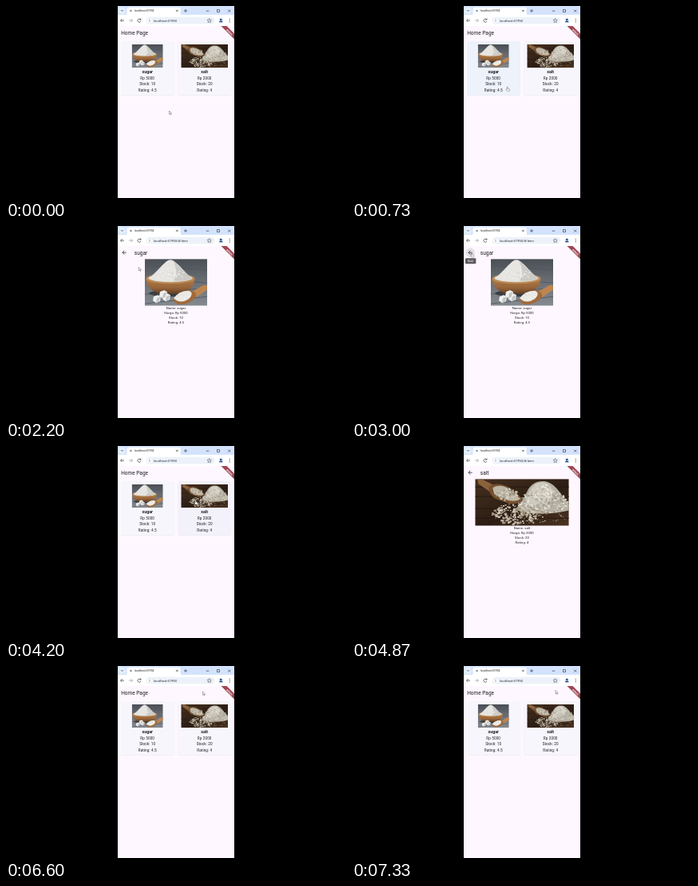
Animation, 426 px wide and 240 px high, one loop 7390 ms. Source, as an HTML page:

```html
<!DOCTYPE html>
<html lang="en">
<head>
<meta charset="utf-8">
<title>Shop demo</title>
<style>
html, body { margin: 0; width: 100%; height: 100%; overflow: hidden; background: #000; }
svg { display: block; width: 100vw; height: 100vh; font-family: Roboto, Arial, sans-serif; }
.line { fill: none; stroke: #454951; stroke-width: .75; }
</style>
</head>
<body>
<svg id="stage" viewBox="0 0 426 240"></svg>
<script>
const LOOP = 7390, STEP = 1000 / 15;
const stage = document.getElementById('stage');

let seed = 17;
const rand = () => (seed = (seed * 16807) % 2147483647) / 2147483647;
const text = (x, y, size, str, attrs = '') =>
  `<text x="${x}" y="${y}" font-size="${size}" fill="#1d1b20" ${attrs}>${str}</text>`;
const centered = (x, y, size, str, gap, attrs = '') =>
  text(x, y, size, str, `text-anchor="middle" letter-spacing="${gap}" ${attrs}`);
const box = (x, y, w, h, fill, attrs = '') =>
  `<rect x="${x}" y="${y}" width="${w}" height="${h}" fill="${fill}" ${attrs}/>`;
const path = (d, fill, attrs = '') => `<path d="${d}" fill="${fill}" ${attrs}/>`;
const line = (d, attrs = '') => `<path class="line" d="${d}" ${attrs}/>`;

// Random specks inside an ellipse
function grains(count, cx, cy, rx, ry, colors, size) {
  let out = '';
  for (let i = 0; i < count; i++) {
    const a = rand() * Math.PI * 2, r = Math.sqrt(rand()), s = size * (.5 + rand());
    out += box((cx + Math.cos(a) * r * rx).toFixed(1), (cy + Math.sin(a) * r * ry).toFixed(1),
      s.toFixed(1), (s * .8).toFixed(1), colors[i % colors.length]);
  }
  return out;
}

function sugarPicture() {
  const cube = (x, y) => path(`M${x} ${y}l5-2 4 2-1 6-5 2-4-3z`, '#f0f0ee') +
    path(`M${x + 4} ${y + 2}l4-2-1 6-4 2z`, '#c3c4c6');
  return box(0, 0, 78, 58.5, 'url(#slate)') +
    line('M0 8L78 14M0 24L78 30M0 44L78 36M0 56L78 47', 'style="stroke:#50555c;stroke-width:.8"') +
    '<ellipse cx="34" cy="43" rx="29" ry="4" fill="#3b3d42"/>' +
    path('M1.5 24C1 34 10 42 22 43.5H42C55 42 63 33 62.5 24Z', 'url(#bowl)') +
    '<ellipse cx="32" cy="24.5" rx="30.5" ry="6.5" fill="#bd8b57"/>' +
    '<ellipse cx="32" cy="24" rx="27.5" ry="5" fill="#dcd8d0"/>' +
    path('M5 24C12 19 20 9 27 3Q32-1 37 3C45 9 52 19 59 24C51 29 14 30 5 24Z', '#e6e5e1') +
    path('M35 2C43 8 52 19 59 24C52 28 42 28 36 27Q43 17 35 2Z', '#cbcac6') +
    grains(80, 32, 19, 20, 8, ['#fff', '#d2d1cd', '#f3f2ee'], 1) +
    cube(11, 47) + cube(23, 45) + cube(19, 41) +
    path('M58 41L73 33Q80 31 79 38L64 48Z', '#bd8550') +
    path('M36 50Q43 41 57 39Q65 41 64 47Q57 57 43 57Q36 55 36 50Z', '#a06a3b') +
    path('M36 49Q44 39 56 40Q62 43 55 50Q44 57 36 49Z', '#eceae5') +
    grains(15, 48, 47, 8, 4, ['#fff', '#d4d1ca'], .9);
}

function saltPicture() {
  return box(0, 0, 117.5, 58.5, 'url(#wood)') +
    line('M0 10H118M0 22H118M0 37H118M0 49H118', 'style="stroke:#241810;stroke-width:.9"') +
    path('M50 38C56 34 60 25 65 16C70 5 79 2 88 3C98 5 106 15 110 23L118 32V39C100 45 61 45 50 38Z', '#b5b0a3') +
    path('M60 34C65 22 70 6 82 4Q94 4 100 17Q88 33 60 34Z', '#cfcabe') +
    grains(230, 84, 28, 31, 14, ['#e6e2d8', '#9f998b', '#cbc5b8'], 2) +
    grains(110, 84, 17, 15, 12, ['#ebe7de', '#b9b3a6', '#d8d3c8'], 1.8) +
    path('M3 1L8 0L24 8L20 17L4 6Z', '#8a623c') +
    path('M17 10Q27 2 44 11L60 25Q56 32 43 31L24 24Q17 18 17 10Z', '#75502f') +
    path('M22 11Q32 5 45 14L57 25Q48 30 37 25L24 19Z', '#beb7a6') +
    grains(90, 39, 19, 14, 7, ['#dfd9cc', '#978d7b', '#c4bcab'], 1.7) +
    grains(210, 50, 43, 30, 13, ['#d9d2c2', '#9d907a', '#bfb5a2'], 2.1) +
    grains(45, 78, 47, 37, 8, ['#b9ae9b', '#84745e'], 1.4);
}

const items = [
  { name: 'sugar', price: 5000, stock: 10, rating: 4.5, w: 78, left: 144 },
  { name: 'salt', price: 2000, stock: 20, rating: 4, w: 117.5, left: 215.5 }
];

function picture(item, cx, y, scale) {
  return `<use href="#${item.name}" transform="translate(${cx - item.w * scale / 2} ${y}) scale(${scale})"/>`;
}

function card(item, i) {
  const cx = item.left + 33.2;
  return box(item.left, 44.6, 66.8, 67.4, '#e4e2ea', 'rx="3" opacity=".75"') +
    box(item.left, 44.2, 66.8, 67.3, '#f7f6fc', `rx="3" id="card${i}"`) +
    picture(item, cx, 48, .5) +
    centered(cx, 83.6, 5.25, item.name, 0, 'font-weight="700"') +
    [`Rp ${item.price}`, `Stock: ${item.stock}`, `Rating: ${item.rating}`]
      .map((s, n) => centered(cx, 91.6 + n * 7.85, 4.65, s, .1)).join('');
}

function detail(item, i) {
  return `<g id="detail${i}">` + box(140, 25, 146, 215, '#fef7ff') +
    `<circle id="hover${i}" cx="148.2" cy="33.2" r="5.9" fill="#e7e1e9"/>` +
    line('M150.7 33.2H146M148.3 30.8L145.9 33.2L148.3 35.6', 'style="stroke:#1d1b20"') +
    text(160.8, 35.6, 6.5, item.name) + picture(item, 213, 41.2, 1) +
    [`Name: ${item.name}`, `Harga: Rp ${item.price}`, `Stock: ${item.stock}`, `Rating: ${item.rating}`]
      .map((s, n) => centered(213, 104.1 + n * 5.85, 4.15, s, .08)).join('') +
    `<g id="tip${i}">` + box(142, 40.2, 13.3, 7, '#5d5a5e', 'rx="1"') +
    '<text x="148.6" y="44.8" font-size="3.3" fill="#fff" text-anchor="middle">Back</text></g></g>';
}

function browser() {
  return box(140, 0, 146, 12, '#d3e3fd') + box(141.5, 1.7, 8, 8.3, '#e6effd', 'rx="2"') +
    line('M144 5L145.5 6.5L147 5') +
    path('M149 12Q151.5 12 151.5 9V4Q151.5 1.8 154 1.8H216Q218.8 1.8 218.8 4V9Q218.8 12 221 12Z', '#fff') +
    '<circle cx="156.5" cy="6" r="1.3" fill="#8d96a3"/>' +
    text(161, 7.2, 3.4, 'localhost:61994') +
    line('M213.2 4.7l2.4 2.4m0-2.4l-2.4 2.4M223 6h4M225 4v4M250.8 6.2h3.5M264.5 4.5h3v3h-3zM278.2 4.6l3 3m0-3l-3 3') +
    box(140, 11, 146, 14, '#fff') +
    line('M148 18.1H143.6M145.6 16L143.5 18.1L145.6 20.2') +
    line('M154 18.1H158.4M156.4 16L158.5 18.1L156.4 20.2', 'opacity=".5"') +
    line('M168.6 16.7A2.1 2.1 0 1 0 169 19M169 15.5V17.2H167.2') +
    box(175.5, 13.7, 86, 8.9, '#edf2fa', 'rx="4.4"') +
    '<circle cx="180" cy="18.1" r="2.7" fill="#fff"/>' +
    line('M180 17.7v1.7M180 16.3v.6') +
    '<text id="url" x="185" y="19.5" font-size="4.05" fill="#252a30"></text>' +
    line('M254.7 15.6l.8 1.7 1.8.2-1.4 1.3.4 1.8-1.6-.9-1.6.9.4-1.8-1.4-1.3 1.8-.2z', 'style="stroke-width:.55"') +
    '<circle cx="269.3" cy="18.1" r="2.9" fill="#dce8fb"/><circle cx="269.3" cy="17" r="1.2" fill="#1d477e"/>' +
    path('M267 20.3Q267 18.5 269.3 18.5T271.6 20.3Z', '#1d477e') +
    [16.1, 18.1, 20.1].map(y => `<circle cx="280.2" cy="${y}" r=".55" fill="#454951"/>`).join('');
}

stage.innerHTML = `<defs>
  <linearGradient id="slate" x2="0" y2="1"><stop stop-color="#4a4e55"/><stop offset=".5" stop-color="#6b7077"/><stop offset="1" stop-color="#858990"/></linearGradient>
  <linearGradient id="bowl" x2="0" y2="1"><stop stop-color="#b17c48"/><stop offset=".6" stop-color="#98653a"/><stop offset="1" stop-color="#643f24"/></linearGradient>
  <linearGradient id="wood" x2="1" y2="1"><stop stop-color="#45301f"/><stop offset=".55" stop-color="#2c1d14"/><stop offset="1" stop-color="#4b3321"/></linearGradient>
  <clipPath id="window"><rect x="140" y="0" width="146" height="240"/></clipPath>
  <clipPath id="view"><rect x="140" y="25" width="146" height="215"/></clipPath>
  <clipPath id="sugarClip"><rect width="78" height="58.5"/></clipPath>
  <clipPath id="saltClip"><rect width="117.5" height="58.5"/></clipPath>
  <g id="sugar" clip-path="url(#sugarClip)">${sugarPicture()}</g>
  <g id="salt" clip-path="url(#saltClip)">${saltPicture()}</g>
</defs>
${box(0, 0, 426, 240, '#000')}
<g clip-path="url(#window)">
  ${browser()}
  <g clip-path="url(#view)">
    ${box(140, 25, 146, 215, '#fef7ff')}
    ${text(144.2, 35.6, 6.5, 'Home Page')}
    ${items.map(card).join('')}
    ${items.map(detail).join('')}
    ${path('M269.5 25H276.5L286 34.5V41.5Z', '#a14754')}
    <text transform="translate(279.2 33.6) rotate(45)" text-anchor="middle" font-size="3" font-weight="700" fill="#fff">DEBUG</text>
  </g>
  <g id="cursor">
    <path id="arrow" d="M0 0V4.3L1.1 3.4L1.8 5L2.5 4.7L1.8 3.1H3.1Z" fill="#fff" stroke="#55504f" stroke-width=".45"/>
    <path id="hand" d="M0 0Q.6-.6 1 .1V2L3 2.5Q3.6 3 3 5H.3L-1.2 3Q-.8 2.4 0 3Z" fill="#fff" stroke="#55504f" stroke-width=".45"/>
  </g>
</g>`;

const el = id => document.getElementById(id);
const clamp = v => Math.max(0, Math.min(1, v));
const ease = v => v * v * (3 - 2 * v);

// Pointer stops: time, x, y
const stops = [
  [0, 204.5, 131], [350, 204.5, 131], [1000, 183, 69], [1850, 183, 69], [2550, 149.5, 34],
  [3200, 149.5, 34], [3900, 237, 68], [4550, 237, 68], [5200, 152.5, 34],
  [5720, 152.5, 34], [6500, 246, 32], [6700, 247, 32], [7250, 255, 30.5], [LOOP, 255, 30.5]
];
const visits = [[1750, 3120], [4480, 5650]];

function pointerAt(t) {
  const n = stops.findIndex(s => s[0] > t);
  const [t0, x0, y0] = stops[n - 1], [t1, x1, y1] = stops[n];
  const k = ease((t - t0) / (t1 - t0));
  return [x0 + (x1 - x0) * k, y0 + (y1 - y0) * k];
}

function draw(t) {
  const [x, y] = pointerAt(t);
  const open = visits.findIndex(([a, b]) => t >= a && t < b);
  const overBack = open >= 0 && Math.hypot(x - 148.2, y - 33.2) < 6;
  let pointing = overBack;
  items.forEach((item, i) => {
    const [start, end] = visits[i];
    const shown = Math.min(ease(clamp((t - start) / 200)), ease(clamp((end + 150 - t) / 150)));
    const scale = .9 + .1 * shown;
    const over = open < 0 && x > item.left && x < item.left + 66.8 && y > 44 && y < 112;
    pointing = pointing || over;
    el('card' + i).setAttribute('fill', over ? (i ? '#f3f1fa' : '#edf2fb') : '#f7f6fc');
    const page = el('detail' + i);
    page.setAttribute('opacity', shown);
    page.setAttribute('transform', `translate(${213 * (1 - scale)} ${132 * (1 - scale)}) scale(${scale})`);
    el('hover' + i).setAttribute('opacity', overBack ? 1 : 0);
    el('tip' + i).setAttribute('opacity', overBack ? (i ? .75 : 1) : 0);
  });
  el('url').textContent = 'localhost:61994' + (open >= 0 ? '/#/item' : '');
  el('cursor').setAttribute('transform', `translate(${x} ${y})`);
  el('arrow').setAttribute('opacity', pointing ? 0 : 1);
  el('hand').setAttribute('opacity', pointing ? 1 : 0);
}

const begin = performance.now();
function tick() {
  const t = (performance.now() - begin) % LOOP;
  draw(Math.floor(t / STEP) * STEP);
  requestAnimationFrame(tick);
}
draw(0);
requestAnimationFrame(tick);
</script>
</body>
</html>
```
